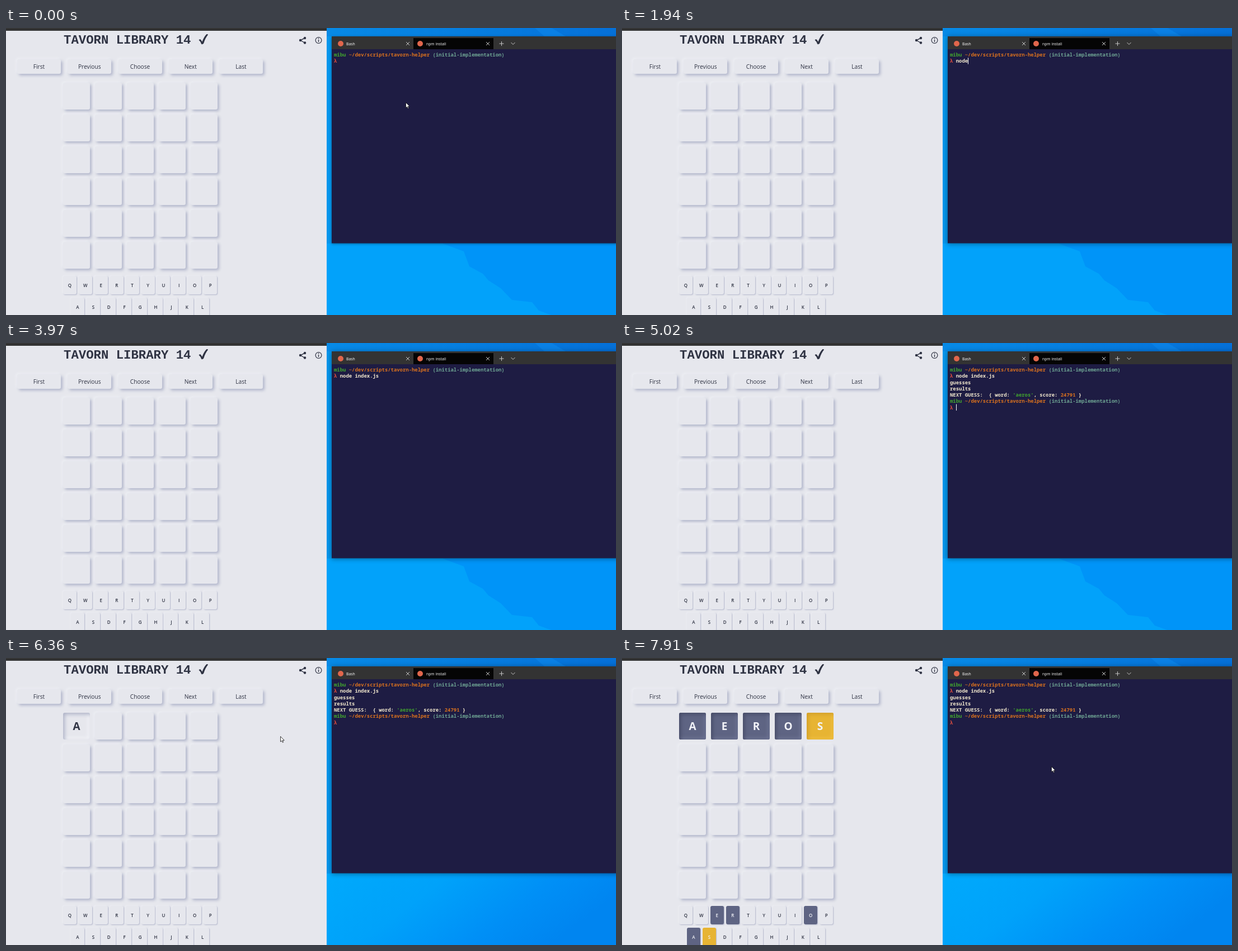
These frames come from a looping animation (1090x514 px, 8000 ms). An HTML page:

```html
<!DOCTYPE html>
<html>
<head>
<meta charset="utf-8">
<style>
  html, body { margin: 0; width: 1090px; height: 514px; overflow: hidden; }
  body { position: relative; font-family: "Open Sans", sans-serif; color: #2f3343; }
  svg { position: absolute; left: 0; top: 0; }
  .box {
    position: absolute; display: flex; align-items: center; justify-content: center;
    box-sizing: border-box; border-radius: 3px; background: #e6e7ed;
    box-shadow: 3px 3px 5px #b3b7cc, -2px -2px 4px #eeeff4;
  }
  .button { width: 78px; height: 26px; font-size: 10.2px; }
  .tile { width: 48px; height: 48px; font-size: 19px; font-weight: 700; }
  .key { width: 24px; height: 33px; font-size: 8px; font-weight: 600; box-shadow: 1px 1px 2px #b3b7cc, -1px -1px 2px #eeeff4; }
  .tile.in { box-shadow: inset 3px 3px 6px #b0b4c8, inset -3px -3px 6px #f3f4f8; }
  .gray, .gold { color: #f2f3f8; }
  .gray { background: #5e6483; }
  .gold { background: #e7b433; }
  .tile.gray { box-shadow: inset 3px 3px 6px #484d69, inset -3px -3px 6px #6e7495; }
  .tile.gold { box-shadow: inset 3px 3px 6px #d2a02b, inset -3px -3px 6px #efbf42; }
  #term text { font: 600 8.92px "Noto Sans Mono", monospace; fill: #f1e7cd; white-space: pre; }
  #term .user { fill: #42a52f; }
  #term .path { fill: #db721e; }
  #term .branch { fill: #6ea493; }
  #term .mark { fill: #e44f40; }
  .tab { font-size: 6.8px; fill: #fff; }
</style>
</head>
<body>
<svg width="1090" height="514">
  <defs>
    <linearGradient id="sky" x1="0" y1="0" x2="1" y2=".35">
      <stop offset="0" stop-color="#00aafc"/>
      <stop offset=".4" stop-color="#00a2fa"/>
      <stop offset=".75" stop-color="#008ff6"/>
      <stop offset="1" stop-color="#0085f0"/>
    </linearGradient>
    <linearGradient id="top">
      <stop offset="0" stop-color="#078ae6"/>
      <stop offset="1" stop-color="#0570d8"/>
    </linearGradient>
  </defs>
  <rect x="573" width="517" height="514" fill="#02a2fa"/>
  <path fill="#0094f8" d="M780 386L818 400 828 427 852 440 862 452 884 466 904 487 940 491 952 506 974 514H1090V386z"/>
  <rect id="smooth" x="573" y="380" width="517" height="134" fill="url(#sky)"/>
  <rect x="573" width="517" height="15" fill="url(#top)"/>
  <path fill="#0a80e4" d="M945 0H975L1000 15H962z"/>
  <rect x="573" y="15" width="9" height="371" fill="#0596ec"/>
  <rect id="win" x="582" y="15" width="520" height="370.5" fill="#1e1c43"/>
  <rect x="582" y="15" width="508" height="23" fill="#333"/>
  <rect x="728" y="18" width="143" height="20" fill="#050505"/>
  <g fill="#e0664c"><circle cx="598" cy="28" r="5"/><circle cx="740" cy="28" r="5"/></g>
  <text class="tab" x="608" y="31">Bash</text>
  <text class="tab" x="751" y="31">npm install</text>
  <path fill="none" stroke="#c8c8c8" d="M715 25l6 6m0-6l-6 6M858 25l6 6m0-6l-6 6M881.5 28h8m-4-4v8M902.500 26l3.500 3.500 3.500-3.500"/>
  <g id="term"></g>
  <rect id="caret" width="1" height="11.500" fill="#fff"/>
  <rect width="573" height="514" fill="#e6e7ed"/>
  <rect width="573" height="5" fill="#333"/>
  <text x="103" y="28.300" fill="#2f3343" style="font:700 22.300px 'Liberation Mono',monospace">TAVORN LIBRARY 14</text>
  <path fill="#2f3343" d="M344.500 21.500q2.500-2.500 4 0l2 3Q354 15 358.500 11q2-.5 2.500 1-5 6-8 16-3 2-4 .5-1-4-4.500-7z"/>
  <g stroke="#2f3343" stroke-width="1.400" fill="none">
    <path d="M534 18l-8 4 8 4.500"/>
    <circle cx="558.500" cy="22" r="5.400" stroke-width="1.200"/>
    <path d="M558.500 21v4m0-6.700v1.400"/>
  </g>
  <g fill="#2f3343"><circle cx="526" cy="22" r="2.200"/><circle cx="534" cy="18" r="2.200"/><circle cx="534" cy="26.500" r="2.200"/></g>
  <path id="arrow" fill="#fff" stroke="#111" stroke-width=".8" d="M.5.5v9.500l2.200-2 1.500 3.300 1.500-.7L4.200 7.400h3z"/>
  <path id="beam" fill="none" stroke="#e8e8f0" d="M-2 .5h4M0 .5v9M-2 9.500h4"/>
</svg>
<script>
const LOOP = 8000, CHAR = 5.352, LINE = 11.25;
const $ = id => document.getElementById(id);
// Last entry whose time has come
const at = (list, t) => list.filter(e => e[0] <= t).pop();

function box(kind, x, y, label = '') {
  const el = document.createElement('div');
  el.className = 'box ' + kind;
  el.style.left = x + 'px';
  el.style.top = y + 'px';
  el.textContent = label;
  document.body.append(el);
  return el;
}

['First', 'Previous', 'Choose', 'Next', 'Last'].forEach((s, i) => box('button', 20 + i * 90.25, 56, s));
const tiles = [];
for (let i = 0; i < 30; i++) tiles.push(box('tile', 102 + i % 5 * 57, 98 + Math.floor(i / 5) * 57));
const keys = {};
['QWERTYUIOP', 'ASDFGHJKL'].forEach((row, r) => [...row].forEach((c, i) => {
  keys[c] = box('key', 102 + r * 14 + i * 27.9, 443.5 + r * 39, c);
}));

const WORD = 'AEROS', REVEAL = 7200, COMMAND = 'node index.js';
const letterTimes = [6360, 6520, 6820, 6940, 7080];
const typed = [[0, 0], [1660, 3], [1940, 4], [2100, 5], [2250, 7], [2400, 8], [2530, 9],
  [2650, 10], [2800, 11], [3200, 12], [3320, 13]];
// time, row, column; no row means hidden
const carets = [[0], [680, 1, 2], [1240], [1510, 1, 2], [3440, 2, 0], [3970], [4560, 5, 0], [5020, 6, 2], [5530]];
// time, shape, x, y
const mice = [[0, 'arrow', 714, 133], [530, 'beam', 716, 133], [1510], [5410, 'beam', 693, 138],
  [5530, 'beam', 604, 138], [5650, 'arrow', 484, 138], [5800, 'arrow', 490, 140],
  [7760, 'arrow', 691, 153], [7910, 'arrow', 767, 194]];

const span = (cls, s) => `<tspan class="${cls}">${s}</tspan>`;
const prompt = span('user', 'mibu') + ' ' + span('path', '~/dev/scripts/tavorn-helper') + ' ' +
  span('branch', '(initial-implementation)');
const lambda = span('mark', 'λ') + ' ';
const output = ['guesses', 'results',
  `NEXT GUESS:  { word: ${span('user', "'aeros'")}, score: ${span('path', '24791')} }`];
let shown = '';

function draw(t) {
  const count = at(typed, t)[1];
  const lines = [prompt, lambda + COMMAND.slice(0, count)];
  if (t >= 4250) lines.push(...output);
  if (t >= 5020) lines.push(prompt, lambda);
  const html = lines.map((s, i) => `<text x="586" y="${51 + i * LINE}">${s}</text>`).join('');
  if (html !== shown) $('term').innerHTML = shown = html;

  const [, row, col] = at(carets, t);
  $('caret').style.display = row ? '' : 'none';
  if (row) {
    $('caret').setAttribute('x', Math.round(586 + (row === 1 ? col + count : col) * CHAR));
    $('caret').setAttribute('y', 42 + row * LINE);
  }

  const [, shape, x, y] = at(mice, t);
  for (const id of ['arrow', 'beam']) {
    $(id).style.display = id === shape ? '' : 'none';
    if (id === shape) $(id).setAttribute('transform', `translate(${x} ${y})`);
  }

  $('smooth').style.display = t >= 5800 ? '' : 'none';
  $('win').style.filter = `drop-shadow(0 1px ${t >= 680 ? 4 : 2}px rgba(0,0,0,.4))`;

  [...WORD].forEach((c, i) => {
    const pressed = t >= letterTimes[i];
    const mark = t < REVEAL ? '' : c === 'S' ? ' gold' : ' gray';
    tiles[i].textContent = pressed ? c : '';
    tiles[i].className = 'box tile' + (pressed ? ' in' : '') + mark;
    keys[c].className = 'box key' + mark;
  });
}

function frame(now) {
  draw(now % LOOP);
  requestAnimationFrame(frame);
}
draw(0);
requestAnimationFrame(frame);
</script>
</body>
</html>
```
